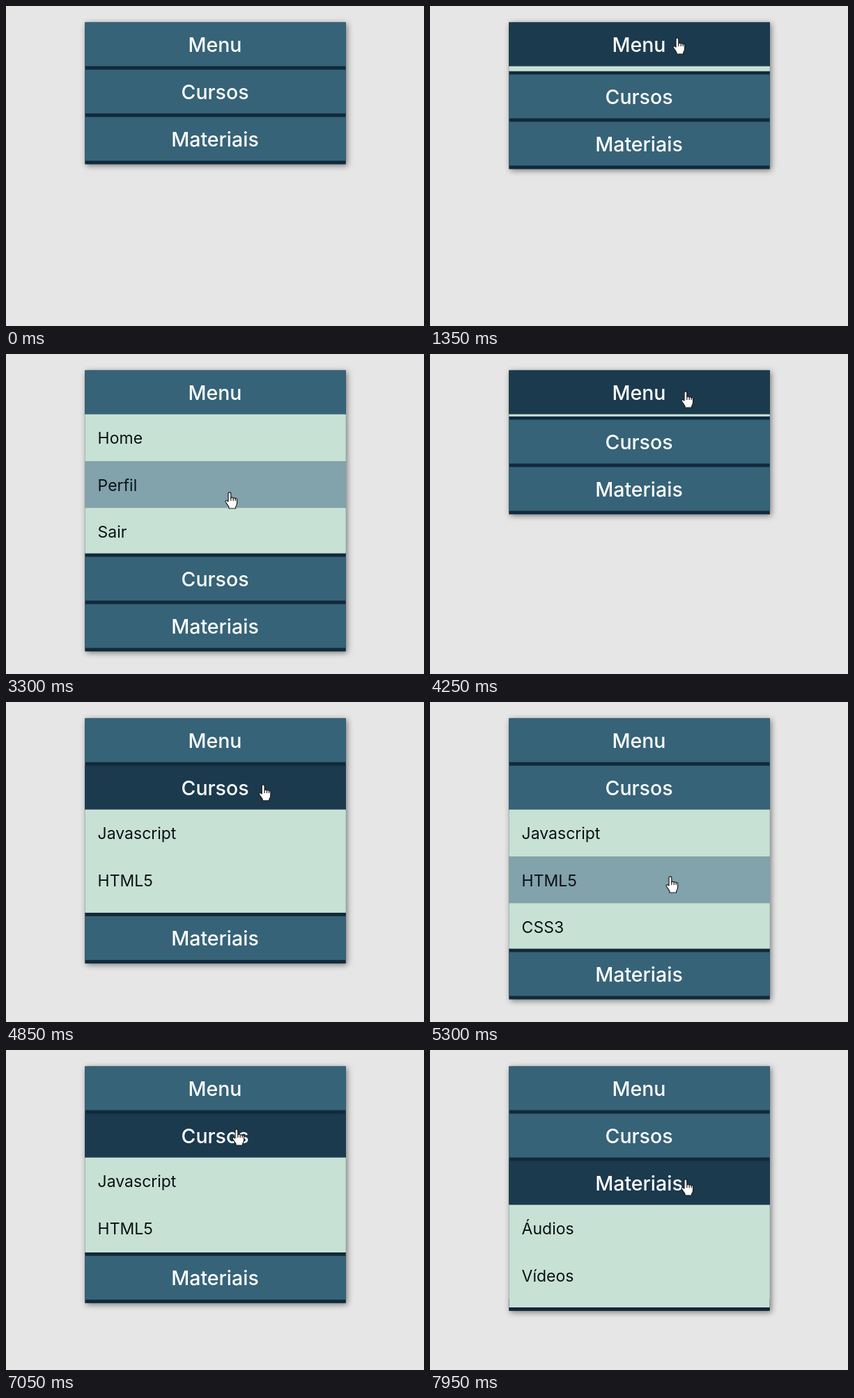
An HTML page for the animation above (8 s loop, 600x460 px).

```html
<!DOCTYPE html>
<html lang="pt">
<head>
<meta charset="utf-8">
<style>
  html, body { margin: 0; width: 100%; height: 100%; overflow: hidden; background: #e6e6e6; }
  svg { display: block; }
  text { font-family: Inter, Roboto, sans-serif; }
  .title { font-size: 28.5px; font-weight: 500; fill: #fff; text-anchor: middle; }
  .label { font-size: 23px; fill: #0b1214; }
  #panel { fill: #11293b; filter: drop-shadow(2px 2px 4px rgba(0, 0, 0, .48)); }
  #hand, #arrow { fill: #fff; stroke: #1c1c1c; stroke-width: 1.2; stroke-linejoin: round; }
</style>
</head>
<body>
<svg id="stage" width="600" height="460" viewBox="0 0 600 460">
  <rect width="600" height="460" fill="#e6e6e6"/>
  <rect id="panel" x="113.3" y="23.5" width="374.5"/>
  <g id="menu"></g>
  <g id="cursor">
    <g id="hand">
      <path d="M-2 13V1.8a1.9 1.9 0 0 1 3.8 0V8c.3-1.2 3-1.2 3.4.4 .6-1 2.7-.8 3 .7 .7-.8 2.4-.4 2.4 1.2V15c0 3-1 4.500-2 6V23H-1V21c-1-2-3-4.500-4.600-7 -1-1.800.8-3.200 2.200-1.800z"/>
      <path d="M1.800 8V12M5.200 8.400V12M8.200 9.100V12" fill="none"/>
    </g>
    <path id="arrow" d="M0 0V16.500L3.900 12.900 6.500 18.700 9 17.600 6.400 12H11.700Z"/>
  </g>
</svg>
<script>
const LOOP = 8000, LEFT = 113.3, TOP = 23.5, WIDTH = 374.5;
const HEAD = 63, LINE = 5, ROW = 67.5, OPEN = 200, SLIDE = 600;
const HOT = 6; // pointer hot spot below the fingertip

const sections = [
  { title: 'Menu', items: ['Home', 'Perfil', 'Sair'], open: 1320, close: 3746 },
  { title: 'Cursos', items: ['Javascript', 'HTML5', 'CSS3'], open: 4584, close: 6925 },
  { title: 'Materiais', items: ['Áudios', 'Vídeos'], open: 7686, close: Infinity }
];

// time, x, y of the pointer tip
const path = [
  [50, 596, 204], [450, 508, 160], [850, 425, 62], [1200, 355, 46],
  [2430, 355, 46], [2750, 338, 165], [3020, 322, 242], [3300, 321, 199],
  [3660, 366, 54], [4270, 367, 54], [4540, 372, 112], [4800, 370, 115],
  [5300, 345, 251], [5700, 340, 302], [6150, 336, 217], [6600, 331, 118],
  [6800, 331, 114], [7050, 331, 114], [7600, 367, 186], [8000, 367, 186]
];

const byId = id => document.getElementById(id);
const set = (el, attrs) => { for (const k in attrs) el.setAttribute(k, attrs[k]); return el; };
function add(parent, tag, attrs, text) {
  const el = set(document.createElementNS('http://www.w3.org/2000/svg', tag), attrs);
  if (text) el.textContent = text;
  return parent.appendChild(el);
}

for (const s of sections) {
  s.g = add(byId('menu'), 'g', {});
  s.head = add(s.g, 'rect', { x: LEFT, width: WIDTH, height: HEAD });
  add(s.g, 'text', { class: 'title', x: 300, y: 42.3 }, s.title);
  s.list = add(s.g, 'svg', { x: LEFT, y: HEAD, width: WIDTH, overflow: 'hidden' });
  add(s.list, 'rect', { width: WIDTH, height: OPEN, fill: '#c8e1d5' });
  s.rows = s.items.map((name, i) => {
    const row = add(s.list, 'rect', { y: i * ROW, width: WIDTH, height: ROW });
    add(s.list, 'text', { class: 'label', x: 18.3, y: i * ROW + 42.500 }, name);
    return row;
  });
}

// cubic-bezier(.25, .1, .25, 1)
function ease(x) {
  if (x <= 0) return 0;
  if (x >= 1) return 1;
  let lo = 0, hi = 1;
  for (let i = 0; i < 24; i++) {
    const m = (lo + hi) / 2;
    if (.75 * m * (1 - m) + m ** 3 < x) lo = m; else hi = m;
  }
  return .3 * lo * (1 - lo) ** 2 + 3 * lo * lo * (1 - lo) + lo ** 3;
}

function pointerAt(t) {
  const i = Math.max(1, path.findIndex(p => p[0] > t));
  const [t0, x0, y0] = path[i - 1], [t1, x1, y1] = path[i];
  const u = Math.max(0, (t - t0) / (t1 - t0)), k = u * u * (3 - 2 * u);
  return [x0 + (x1 - x0) * k, y0 + (y1 - y0) * k];
}

function draw(t) {
  const [px, py] = pointerAt(t);
  const shown = t >= 50;
  const inside = shown && px > LEFT && px < LEFT + WIDTH;
  const over = (y, h) => inside && py + HOT >= y && py + HOT < y + h;
  let y = TOP;
  for (const s of sections) {
    const h = OPEN * (ease((t - s.open) / SLIDE) - ease((t - s.close) / SLIDE));
    set(s.g, { transform: `translate(0 ${y})` });
    set(s.head, { fill: over(y, HEAD) ? '#1b3a4e' : '#366378' });
    set(s.list, { height: Math.max(h, .01), visibility: h > .05 ? 'visible' : 'hidden' });
    s.rows.forEach((row, i) => {
      const hit = over(y + HEAD + i * ROW, Math.min(ROW, h - i * ROW));
      set(row, { fill: hit ? '#82a2ac' : '#c8e1d5' });
    });
    y += HEAD + h + LINE;
  }
  set(byId('panel'), { height: y - TOP });
  set(byId('cursor'), { transform: `translate(${px} ${py})`, visibility: shown ? 'visible' : 'hidden' });
  set(byId('hand'), { display: inside ? 'inline' : 'none' });
  set(byId('arrow'), { display: inside ? 'none' : 'inline' });
}

const start = performance.now();
function tick() {
  draw((performance.now() - start) % LOOP);
  requestAnimationFrame(tick);
}
tick();
</script>
</body>
</html>
```
